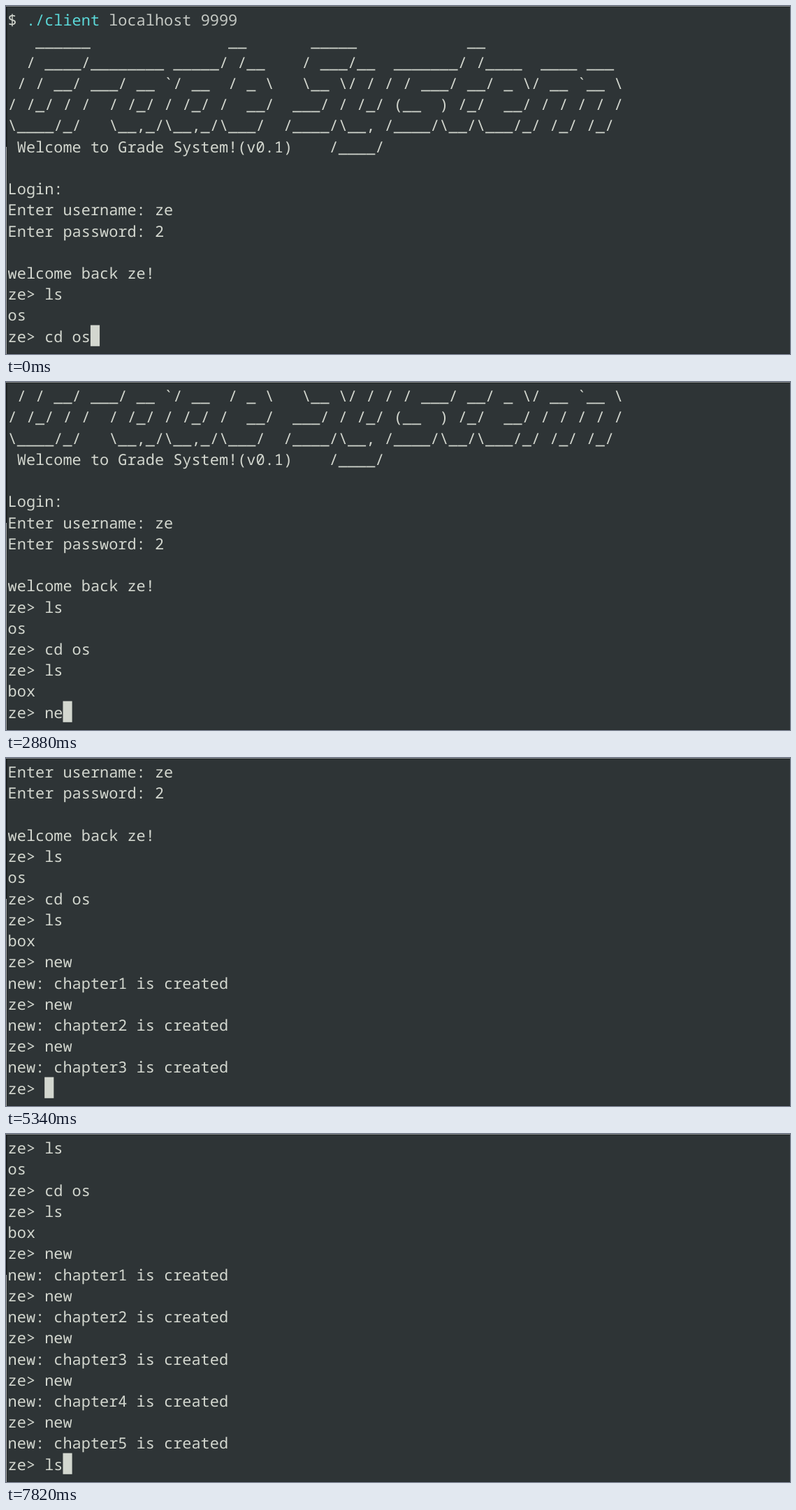
Write an HTML page that moves like this. It is 1122x499 px and loops after 8000 ms.

```html
<!DOCTYPE html>
<html lang="en">
<head>
<meta charset="utf-8">
<title>Grade System</title>
<style>
  html, body { margin: 0; width: 100%; height: 100%; overflow: hidden; background: #2e3436; }
  svg { display: block; }
  text {
    font: 21.91px "Noto Sans Mono", monospace;
    font-variant-ligatures: none;
    white-space: pre;
    text-rendering: geometricPrecision;
    fill: #d3d7cf;
  }
  .command { fill: #5bd8d8; }
  .argument { fill: #c5c9c4; }
</style>
</head>
<body>
<svg id="screen" width="1122" height="499" viewBox="0 0 1122 499">
  <rect width="1122" height="499" fill="#2e3436"/>
  <g id="lines"></g>
  <rect id="cursor" y="457.6" width="13.15" height="30.2" fill="#d3d7cf"/>
  <g id="edges">
    <rect y="1" width="1122" height="1" fill="#1f2425"/>
    <rect x="1" y="1" width="1" height="498" fill="#232829"/>
    <rect y="498" width="1122" height="1" fill="#272c2e"/>
    <rect width="1" height="202" fill="#121516"/>
    <rect y="202" width="1" height="297" fill="#a6a9a9"/>
    <rect width="1122" height="1" fill="#85898a"/>
  </g>
</svg>
<script>
const LOOP = 8000;
const ROWS = 16, PITCH = 30.235, CELL = 13.146, LEFT = 2.6, BASE = 28.2;
const PROMPT = 'ze> ';
const SVG = 'http://www.w3.org/2000/svg';

const history = String.raw`$ ./client localhost 9999
   ______               __       _____            __
  / ____/________ _____/ /__    / ___/__  _______/ /____  ____ ___
 / / __/ ___/ __ ${'`'}/ __  / _ \   \__ \/ / / / ___/ __/ _ \/ __ ${'`'}__ \
/ /_/ / /  / /_/ / /_/ /  __/  ___/ / /_/ (__  ) /_/  __/ / / / / /
\____/_/   \__,_/\__,_/\___/  /____/\__, /____/\__/\___/_/ /_/ /_/
 Welcome to Grade System!(v0.1)    /____/

Login:
Enter username: ze
Enter password: 2

welcome back ze!
ze> ls
os
ze> cd os
ze> ls
box`.split('\n');
for (let n = 1; n <= 5; n++) history.push(PROMPT + 'new', `new: chapter${n} is created`);

// time, lines above the prompt, typed text, cursor shown
const steps = [
  [0, 15, 'cd os', 1],
  [190, 16, '', 1], [790, 16, '', 0], [1410, 16, '', 1], [1480, 16, 'l', 1], [1550, 16, 'ls', 1],
  [1740, 18, '', 1], [2270, 18, '', 0], [2740, 18, '', 1],
  ...typeNew(18, 2810, 2880, 2950),
  [3540, 20, '', 1], ...typeNew(20, 4140, 4215, 4290),
  [4550, 22, '', 1], ...typeNew(22, 4940, 5080, 5140),
  [5340, 24, '', 1], ...typeNew(24, 5760, 5865, 5970),
  [6170, 26, '', 1], ...typeNew(26, 6500, 6600, 6700),
  [6960, 28, '', 1], [7490, 28, '', 0], [7690, 28, 'l', 1], [7820, 28, 'ls', 1],
];

function typeNew(count, ...times) {
  return times.map((time, i) => [time, count, 'new'.slice(0, i + 1), 1]);
}

function addLine(content) {
  const el = document.createElementNS(SVG, 'text');
  el.setAttribute('x', LEFT);
  el.textContent = content;
  return document.getElementById('lines').appendChild(el);
}

function addSpan(parent, content, name) {
  const el = document.createElementNS(SVG, 'tspan');
  el.setAttribute('class', name);
  el.textContent = content;
  parent.appendChild(el);
}

const lines = history.map(addLine);
lines[0].textContent = '$ ';
addSpan(lines[0], './client', 'command');
addSpan(lines[0], ' localhost 9999', 'argument');

const input = addLine('');
input.setAttribute('y', BASE + (ROWS - 1) * PITCH);
const cursor = document.getElementById('cursor');

function render([, count, typed, on]) {
  const first = count - (ROWS - 1);
  lines.forEach((el, i) => {
    el.setAttribute('y', BASE + (i - first) * PITCH);
    el.style.display = i >= first && i < count ? '' : 'none';
  });
  input.textContent = PROMPT + typed;
  cursor.setAttribute('x', LEFT + (PROMPT.length + typed.length) * CELL);
  cursor.style.display = on ? '' : 'none';
}

let shown;
const start = performance.now();
function tick() {
  const t = (performance.now() - start) % LOOP;
  const step = steps.findLast(s => s[0] <= t);
  if (step !== shown) render(shown = step);
  requestAnimationFrame(tick);
}
tick();
</script>
</body>
</html>
```
